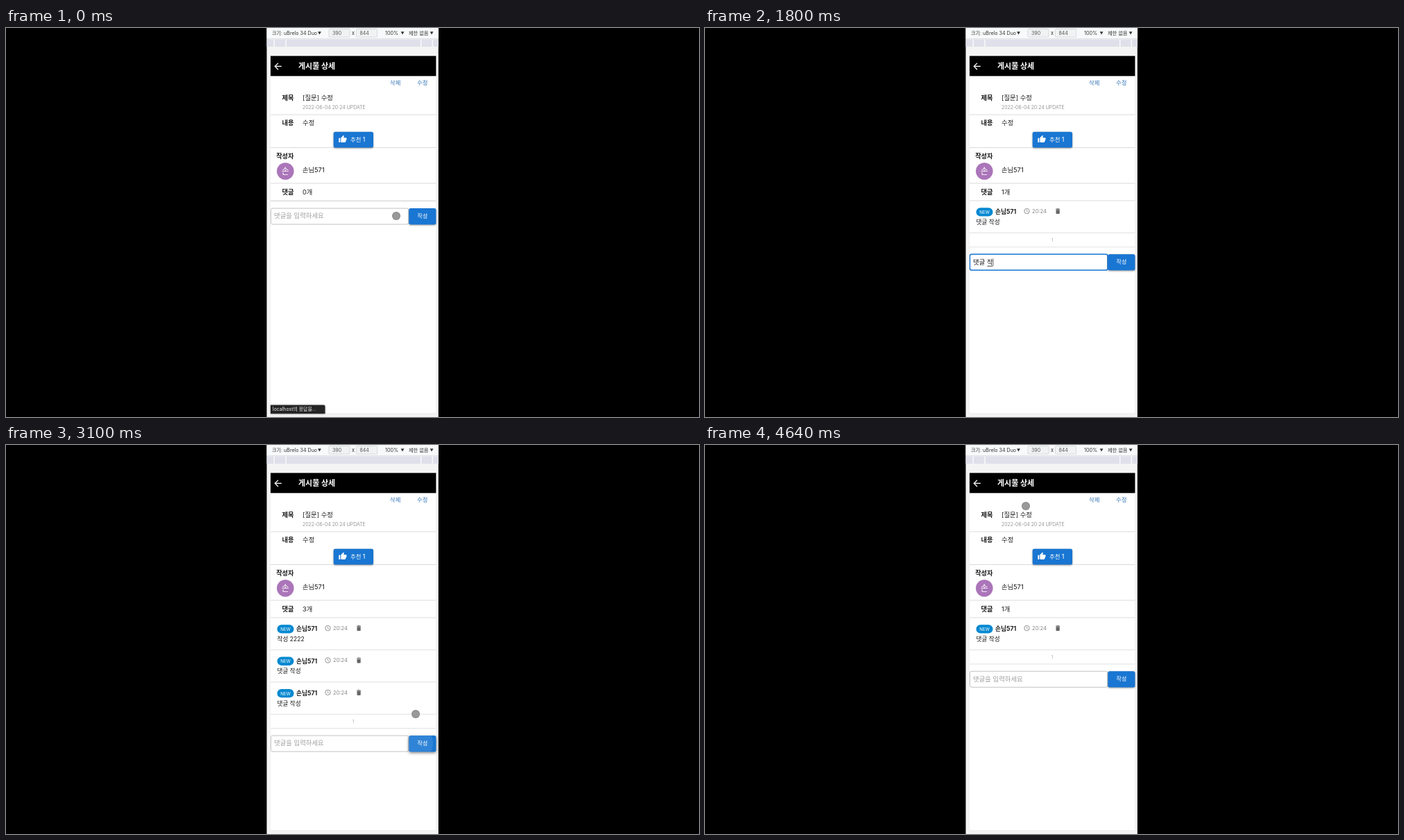
These frames come from a looping animation (998x561 px, 4.78 s). An HTML page with a canvas:

```html
<!DOCTYPE html>
<html lang="ko">
<head>
<meta charset="utf-8">
<title>게시물 상세</title>
<style>
  html, body { margin: 0; width: 100%; height: 100%; overflow: hidden; background: #000; }
  canvas { display: block; width: 998px; height: 561px; }
</style>
</head>
<body>
<canvas id="stage"></canvas>
<script>
const W = 998, H = 561, LOOP = 4780;
const LEFT = 381, RIGHT = 619.3, ROW = 46.4;
const BLUE = '#1976d2', LINE = '#dcdcdc', INK = '#1c1c1c', MUTED = '#969696';
const FONT = 'Inter, "Noto Sans CJK KR", "Noto Sans CJK", sans-serif';
const USER = '손님571', DEVICE = 'uBrelo 34 Duo';

const canvas = document.getElementById('stage');
const ctx = canvas.getContext('2d');
const dpr = window.devicePixelRatio || 1;
canvas.width = W * dpr;
canvas.height = H * dpr;

const thumb = new Path2D('M1 21h4V9H1v12zm22-11c0-1.1-.9-2-2-2h-6.31l.95-4.57.03-.32c0-.41-.17-.79-.44-1.06L14.17 1 7.59 7.59C7.22 7.95 7 8.45 7 9v10c0 1.1.9 2 2 2h9c.83 0 1.54-.5 1.84-1.22l3.02-7.05c.09-.23.14-.47.14-.73v-2z');

// Pointer trips: [ms, x, y]; the pointer is hidden between trips.
const trips = [
  [[0, 562, 271], [500, 562, 271]],
  [[1100, 601, 407], [1200, 594, 285], [1300, 592, 274], [1500, 560, 338]],
  [[2000, 594, 340], [2100, 594, 338], [2300, 595, 400], [2500, 556, 384]],
  [[3000, 594, 387], [3100, 590, 388], [3400, 510, 266], [3500, 508, 264]],
  [[3900, 560, 252], [4000, 508, 264]],
  [[4400, 604, 262], [4500, 563, 259], [4640, 462, 88]]
];

// Each entry: focus start, typing start, submit time, typed stages.
const first = '댓글 작성', second = '작성 2222';
const entries = [
  [200, 700, 1300, ['ㄷ', '댓', '댓글', '댓글 자', first]],
  [1500, 1600, 2100, ['대', '댓글', '댓글 작', first]],
  [2500, 2600, 3100, ['자', '작성', '작성 22', second]]
];
const within = (t, a, b) => t >= a && t < b;

function commentsAt(t) {
  if (t < 1300) return [];
  if (t < 2100 || t >= 4300) return [first];
  if (t < 3100 || t >= 3900) return [first, first];
  return [second, first, first];
}

function pointerAt(t) {
  const trip = trips.find(p => t >= p[0][0] && t <= p[p.length - 1][0]);
  if (!trip) return null;
  const i = Math.max(1, trip.findIndex(p => p[0] >= t));
  const [ta, xa, ya] = trip[i - 1], [tb, xb, yb] = trip[i];
  const k = (t - ta) / (tb - ta);
  return [xa + (xb - xa) * k, ya + (yb - ya) * k];
}

function rect(x, y, w, h, color) {
  ctx.fillStyle = color;
  ctx.fillRect(x, y, w, h);
}

function rounded(x, y, w, h, r) {
  ctx.beginPath();
  ctx.roundRect(x, y, w, h, r);
}

function disc(x, y, r, color) {
  ctx.beginPath();
  ctx.arc(x, y, r, 0, Math.PI * 2);
  ctx.fillStyle = color;
  ctx.fill();
}

function stroke(points, color, width) {
  ctx.beginPath();
  points.forEach(([x, y]) => ctx.lineTo(x, y));
  ctx.strokeStyle = color;
  ctx.lineWidth = width;
  ctx.stroke();
}

// y is the visual middle of the text.
function text(str, x, y, size, color = INK, weight = 400, align = 'left') {
  ctx.font = `${weight} ${size}px ${FONT}`;
  ctx.textAlign = align;
  ctx.fillStyle = color;
  ctx.fillText(str, x, y + size * 0.36);
  return ctx.measureText(str).width;
}

function rule(y, color = LINE) {
  rect(LEFT, y - 0.5, RIGHT - LEFT, 1, color);
}

function button(x, y, w, h, raised) {
  ctx.save();
  ctx.shadowColor = raised ? 'rgba(0,0,0,.5)' : 'rgba(0,0,0,.4)';
  ctx.shadowBlur = (raised ? 4 : 2.5) * dpr;
  ctx.shadowOffsetY = (raised ? 1.6 : 1) * dpr;
  rounded(x, y, w, h, 2.5);
  ctx.fillStyle = BLUE;
  ctx.fill();
  ctx.restore();
}

function caretDown(x, y) {
  ctx.beginPath();
  ctx.moveTo(x - 2.4, y - 2);
  ctx.lineTo(x + 2.4, y - 2);
  ctx.lineTo(x, y + 2.2);
  ctx.fillStyle = '#333';
  ctx.fill();
}

function sizeBox(x, label) {
  rounded(x, 1.5, 30, 11.5, 1);
  ctx.fillStyle = '#f1f2f3';
  ctx.fill();
  ctx.strokeStyle = '#d2d4d6';
  ctx.lineWidth = 0.8;
  ctx.stroke();
  text(label, x + 5, 7.3, 7, '#555');
}

function toolbar() {
  rect(375.5, 0, 247.2, H, '#f4f4f4');
  rect(375.5, 0, 247.2, 15, '#f8f9fa');
  rect(375.5, 15, 247.2, 1, '#dfe0e2');
  rect(375.5, 16.5, 247.2, 10.5, '#dfe0ea');
  [386, 403, 597.5, 614].forEach(x => rect(x - 0.5, 16.5, 1.2, 10.5, '#fff'));
  text('크기: ' + DEVICE, 383, 7.3, 7.1, '#333');
  caretDown(451.5, 7.2);
  sizeBox(465, '390');
  text('x', 500, 7.6, 7.5, '#333', 400, 'center');
  sizeBox(504.5, '844');
  text('100%', 546, 7.3, 7.2, '#333');
  caretDown(571, 7.2);
  text('제한 없음', 580, 7.3, 7.2, '#333');
  caretDown(613, 7.2);
}

function post() {
  rect(LEFT - 0.5, 40, RIGHT - LEFT + 1, 516.5, '#ececec');
  rect(LEFT, 40, RIGHT - LEFT, 515.5, '#fff');
  rect(LEFT, 40.3, RIGHT - LEFT, 29, '#000');
  stroke([[396.8, 55.3], [387.6, 55.3]], '#fff', 1.3);
  stroke([[392, 50.6], [387.3, 55.3], [392, 60]], '#fff', 1.3);
  text('게시물 상세', 421, 55, 11, '#fff', 700);

  text('삭제', 553, 79.3, 8.3, '#3a78b8');
  text('수정', 592, 79.3, 8.3, '#3a78b8');
  text('제목', 414.5, 101, 9.3, INK, 700, 'right');
  text('[질문] 수정', 427, 101, 9.4);
  text('2022-06-04 20:24 UPDATE', 427, 114.3, 6.9, MUTED);
  rule(125);
  text('내용', 414.5, 137, 9.3, INK, 700, 'right');
  text('수정', 427, 137, 9.4);
  rule(172.5);
  button(471.7, 149.8, 57.3, 22.7, false);
  ctx.save();
  ctx.translate(478.8, 154.2);
  ctx.scale(0.51, 0.51);
  ctx.fillStyle = '#fff';
  ctx.fill(thumb);
  ctx.restore();
  text('추천 1', 496, 160.7, 8.4, '#fff', 500);

  text('작성자', 414.5, 184.5, 9.2, INK, 700, 'right');
  disc(402.3, 206.5, 12.3, '#ab75b9');
  text(USER[0], 402.3, 206.2, 12, '#fff', 400, 'center');
  text(USER, 427, 204.8, 9.3);
  rule(224);
}

function comment(body, y) {
  rounded(390.5, y + 10.2, 24, 12.3, 6.1);
  ctx.fillStyle = '#0288d1';
  ctx.fill();
  text('NEW', 402.6, y + 16.5, 6.2, '#fff', 400, 'center');
  text(USER, 418, y + 16, 8.7, INK, 700);

  ctx.beginPath();
  ctx.arc(463.5, y + 15.1, 3.7, 0, Math.PI * 2);
  ctx.strokeStyle = '#858585';
  ctx.lineWidth = 0.9;
  ctx.stroke();
  stroke([[463.4, y + 12.8], [463.4, y + 15.3], [465.2, y + 16.4]], '#858585', 0.8);
  text('20:24', 471, y + 15.1, 7.6, '#858585');

  rect(505, y + 11.8, 6.2, 1, '#666');
  rect(506.8, y + 11.2, 2.6, 0.8, '#666');
  rounded(505.5, y + 13.3, 5.2, 5.8, [0, 0, 0.9, 0.9]);
  ctx.fillStyle = '#666';
  ctx.fill();

  text(body, 390.5, y + 31, 8.6);
  rule(y + ROW, '#e0e0e0');
}

function field(t, y) {
  const entry = entries.find(e => within(t, e[0], e[2]));
  rounded(LEFT + 0.5, y + 0.3, 198.3, 23, 2.5);
  ctx.strokeStyle = entry ? BLUE : '#bcbcbc';
  ctx.lineWidth = entry ? 1.4 : 0.9;
  ctx.stroke();

  const mid = y + 11.3;
  if (!entry || t < entry[1]) {
    text('댓글을 입력하세요', 386, mid, 9.4, '#a0a0a0');
    if (entry) rect(386, mid - 5, 0.7, 11, INK);
    return;
  }
  const stages = entry[3];
  const typed = stages[Math.min(stages.length - 1, Math.floor((t - entry[1]) / 100))];
  const width = text(typed, 386, mid + 0.5, 9.4);
  const last = ctx.measureText(typed.slice(-1)).width;
  if (!/\d$/.test(typed)) rect(386 + width - last + 0.5, mid + 5.6, last - 0.8, 0.8, INK);
  rect(386 + width, mid - 5, 0.7, 11, INK);
}

function submit(t, y) {
  const idle = !entries.some(e => within(t, e[0], e[2]));
  const top = y + 0.3;
  button(580.2, top, 39.1, 23.3, idle && within(t, 1300, 3800));
  const hit = entries.find(e => within(t, e[2], e[2] + 100));
  if (hit) {
    ctx.save();
    rounded(580.2, top, 39.1, 23.3, 2.5);
    ctx.clip();
    disc(591, top + 11, hit[2] === 3100 ? 24 : 32, 'rgba(255,255,255,.1)');
    ctx.restore();
  }
  text('작성', 599.7, y + 11.5, 8.2, '#fff', 500, 'center');
}

function statusBubble() {
  ctx.save();
  ctx.shadowColor = 'rgba(0,0,0,.4)';
  ctx.shadowBlur = 3 * dpr;
  rounded(LEFT, 543.8, 78.5, 12.5, [0, 2, 0, 0]);
  ctx.fillStyle = '#242424';
  ctx.fill();
  ctx.restore();
  text('localhost의 응답을...', 384, 549.8, 6.9, '#f0f0f0');
}

function dialog() {
  ctx.save();
  ctx.beginPath();
  ctx.rect(375.5, 0, 247.2, H);
  ctx.clip();
  ctx.shadowColor = 'rgba(0,0,0,.4)';
  ctx.shadowBlur = 4 * dpr;
  rounded(554, -4, 90, 61, 2);
  ctx.fillStyle = '#292c2f';
  ctx.fill();
  ctx.shadowColor = 'transparent';
  text('댓글을 삭제하시겠습니까?', 564, 12.3, 7.3, '#fff', 700);
  ctx.restore();
}

function draw(t) {
  ctx.setTransform(dpr, 0, 0, dpr, 0, 0);
  rect(0, 0, W, H, '#000');
  toolbar();
  post();

  const list = commentsAt(t), n = list.length;
  text('댓글', 414.5, 236.3, 9.3, INK, 700, 'right');
  text(n + '개', 427, 236.3, 9.3);
  rule(249);
  list.forEach((body, i) => comment(body, 249 + i * ROW));
  const end = 249 + n * ROW;
  if (n) {
    text('1', 500, end + 10, 6.6, '#aaa', 400, 'center');
    rule(end + 20.5, '#e2e2e2');
  } else {
    rule(249.8);
  }
  const y = end + (n ? 30.6 : 10.8);
  field(t, y);
  submit(t, y);

  if (t < 200) statusBubble();
  const p = pointerAt(t);
  if (p) {
    disc(p[0], p[1], 6, '#858585');
    disc(p[0], p[1], 5.1, '#999');
  }
  if (within(t, 3600, 3900) || within(t, 4100, 4300)) dialog();
}

function tick(now) {
  const t = now % LOOP;
  draw(t >= 4640 ? 4640 : Math.min(4500, Math.floor(t / 100) * 100));
  requestAnimationFrame(tick);
}
draw(0);
requestAnimationFrame(tick);
</script>
</body>
</html>
```
